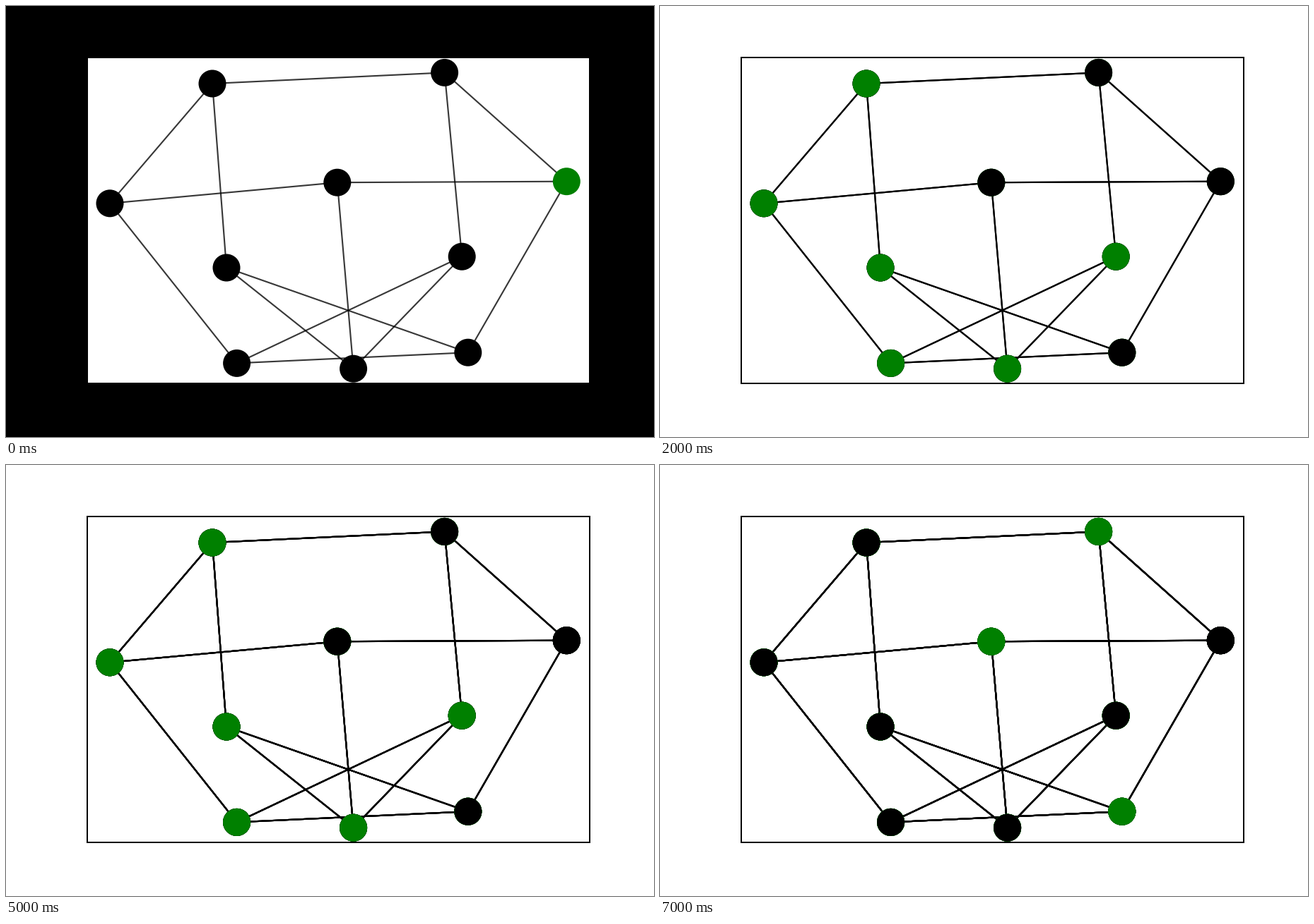
A matplotlib script that plays this animation: 917 px wide and 611 px high, repeating every 8 s.

```python
import matplotlib.pyplot as plt
from matplotlib.animation import ArtistAnimation
from matplotlib.collections import LineCollection
from matplotlib.patches import Rectangle

W, H, DPI = 917, 611, 100
PT = 72 / DPI  # points per pixel
STEPS = 8

NODES = {
    "A": (292, 110), "B": (620.6, 94.4), "C": (793.3, 248.7), "D": (468.8, 250.2),
    "E": (147, 279.8), "F": (312, 371), "G": (645.2, 355.2),
    "H": (326.6, 506.4), "I": (491.6, 514.2), "J": (653.8, 491.2),
}
EDGES = "AB AE AF BC BG DE DC DI CJ EH FI FJ GH GI HJ".split()

START, NEAR, FAR = "C", "BDJ", "AEFGHI"
CYCLE = [NEAR, FAR, NEAR + FAR]


def lit_nodes(step):
    return START if step == 0 else CYCLE[(step - 1) % 3]


fig = plt.figure(figsize=(W / DPI, H / DPI), dpi=DPI, facecolor="white")
ax = fig.add_axes([0, 0, 1, 1])
ax.set_xlim(0, W)
ax.set_ylim(H, 0)
ax.axis("off")

backdrop = ax.add_patch(Rectangle((0, 0), W, H, fc="black", lw=0, zorder=0))
ax.add_patch(Rectangle((115, 73), 711, 462, fc="white", ec="black",
                       lw=2 * PT, joinstyle="miter", snap=False, zorder=0.5))


def draw_graph(step):
    lit = lit_nodes(step)
    lines = LineCollection([[NODES[a], NODES[b]] for a, b in EDGES],
                           colors="black", linewidths=2.13 * PT, alpha=0.78, zorder=1)
    ax.add_collection(lines, autolim=False)
    xs, ys = zip(*NODES.values())
    colors = ["green" if name in lit else "black" for name in NODES]
    dots = ax.scatter(xs, ys, s=(39 * PT) ** 2, c=colors, linewidths=0, zorder=2)
    return [lines, dots]


# Each step is painted over the earlier ones, so the edges darken.
layers = [draw_graph(step) for step in range(STEPS)]
frames = [sum(layers[:step + 1], []) for step in range(STEPS)]
frames[0].append(backdrop)

anim = ArtistAnimation(fig, frames, interval=1000, repeat=True, repeat_delay=0)
plt.show()
```
